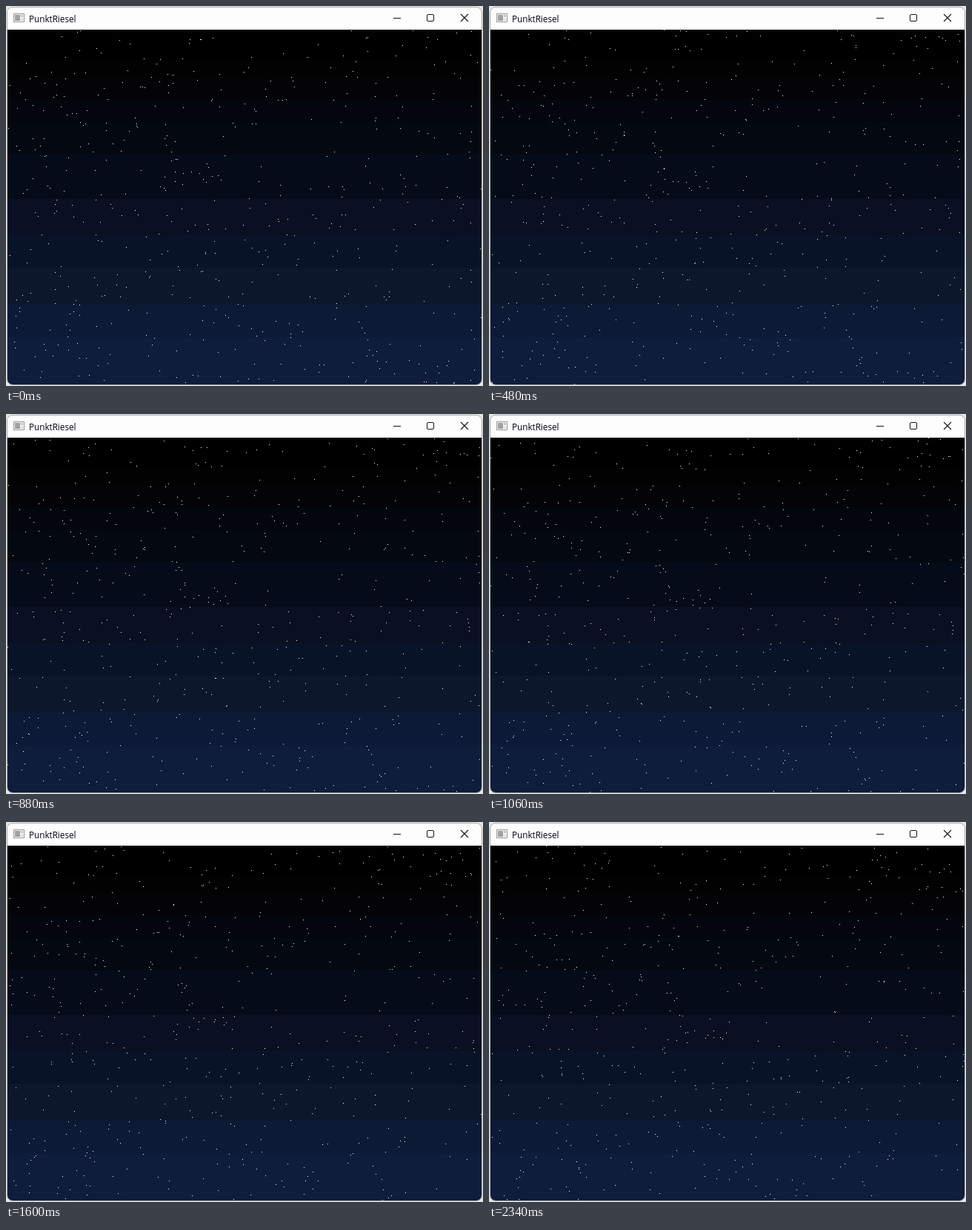
These frames come from a looping animation (644 by 514 pixels, 2400 ms). An HTML page with a canvas:

```html
<!DOCTYPE html>
<html lang="de">
<head>
<meta charset="utf-8">
<title>PunktRiesel</title>
<style>
  html, body { margin: 0; width: 100%; height: 100%; overflow: hidden; background: #e6e6e6; }
  #win {
    position: absolute; left: 0; top: 0; width: 640px; height: 510px; margin: 1px;
    border: 1px solid #a9aba9; border-radius: 8px; overflow: hidden; background: #fdfdfd;
  }
  #title {
    position: absolute; left: 29px; top: 5px; line-height: 20px; white-space: nowrap;
    font-family: "Open Sans", "Noto Sans", sans-serif; font-size: 11.7px; color: #00040f;
  }
  svg { position: absolute; left: -2px; top: -2px; }
  canvas { position: absolute; left: 0; top: 30px; }
</style>
</head>
<body>
<div id="win">
  <svg width="644" height="32" fill="none" stroke="#111">
    <rect x="10.5" y="10.5" width="14" height="11" fill="#f6f6f6" stroke="#999"/>
    <path d="M12 12h7v8h-7z" fill="#a0a0a0" stroke="none"/>
    <path d="M20 12h3v3h-3z" fill="#c4c4c4" stroke="none"/>
    <path d="M20 17h3v3h-3z" fill="#dcdcdc" stroke="none"/>
    <path d="M523 16.5h10"/>
    <rect x="568.5" y="11.5" width="9" height="9" rx="1.5"/>
    <path d="M614 11l10 10M624 11l-10 10" stroke-width="1.1"/>
  </svg>
  <div id="title">PunktRiesel</div>
  <canvas id="sky" width="640" height="480"></canvas>
</div>
<script>
const W = 640, H = 480, FLAKES = 500, STEPS = 30, LOOP = 2400;
const ctx = document.getElementById('sky').getContext('2d');

// Top edge and colour of each band of the night sky
const bands = [
  [0, '#000200'], [10, '#000000'], [42, '#020203'], [66, '#040407'],
  [94, '#03060e'], [125, '#040810'], [169, '#050c19'], [229, '#0a0f21'],
  [278, '#071428'], [322, '#0c172c'], [372, '#0c1a36'], [416, '#0e1d3c']
];

// Step lengths in ms: 80 unless listed
const odd = { 11: 100, 19: 60, 21: 100, 24: 60, 28: 100, 29: 60 };
const starts = [0];
for (let i = 0; i < STEPS - 1; i++) starts.push(starts[i] + (odd[i] || 80));

let seed = 20231;
function rand(n) {
  seed = (Math.imul(seed, 1664525) + 1013904223) >>> 0;
  return Math.floor(seed / 4294967296 * n);
}

// Each flake wanders down and to the right by small random steps
const paths = Array.from({ length: FLAKES }, () => {
  let x = rand(W), y = rand(H);
  return Array.from({ length: STEPS }, () => {
    const spot = [x % W, y % H];
    x += rand(3);
    y += 1 + rand(3);
    return spot;
  });
});

function draw(step) {
  for (const [top, color] of bands) {
    ctx.fillStyle = color;
    ctx.fillRect(0, top, W, H - top);
  }
  ctx.fillStyle = '#fff';
  for (const path of paths) ctx.fillRect(...path[step], 1, 1);
}

let shown = -1;
function tick() {
  const t = performance.now() % LOOP;
  const step = starts.filter(s => s <= t).length - 1;
  if (step !== shown) draw(shown = step);
  requestAnimationFrame(tick);
}
tick();
</script>
</body>
</html>
```
